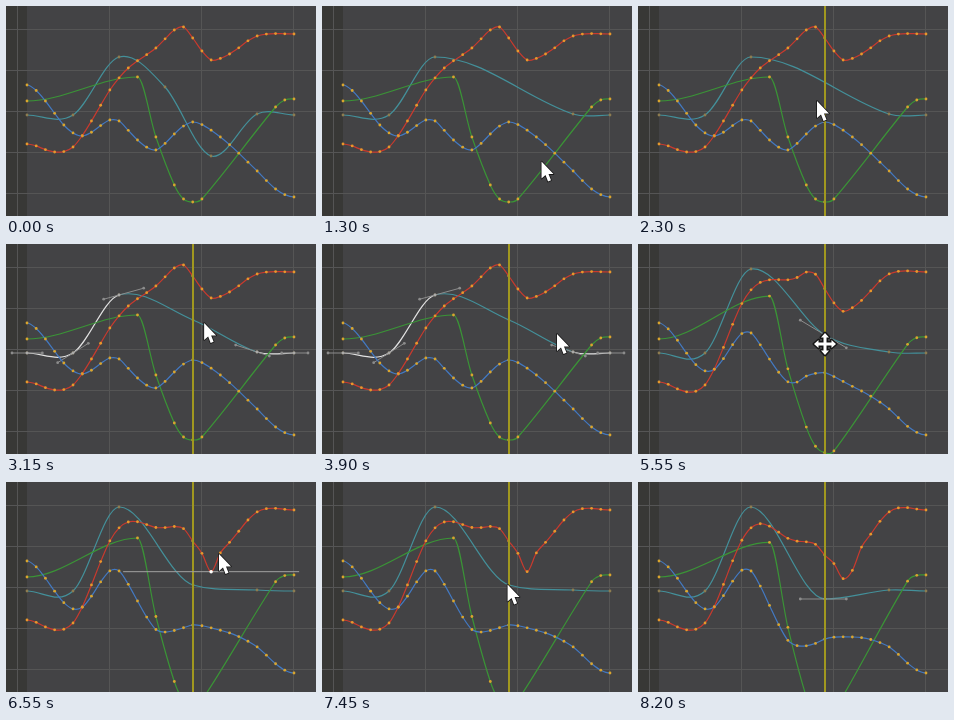
An HTML page with a canvas for the animation above (8500 ms loop, 310 by 210 pixels).

```html
<!DOCTYPE html>
<html lang="en">
<head>
<meta charset="utf-8">
<title>Curve editor</title>
<style>
html, body { margin: 0; height: 100%; overflow: hidden; background: #434345; }
canvas { display: block; }
</style>
</head>
<body>
<canvas id="stage" width="310" height="210"></canvas>
<script>
const ctx = document.getElementById('stage').getContext('2d');
const LOOP = 8500, STEP = 50;
const FRAMES = 30, SWEEP = 200, SWEEP_START = 50;
const TEAL = '#43909a';
const mix = (a, b, p) => a + (b - a) * p;
const within = (t, a, b) => t >= a && t < b;
const frameX = i => 21 + i * 267 / 29;

// Linear interpolation through [time, ...values] stops
function track(t, stops) {
  const next = stops.findIndex(s => s[0] >= t);
  if (next === 0) return stops[0].slice(1);
  if (next < 0) return stops[stops.length - 1].slice(1);
  const a = stops[next - 1], b = stops[next];
  const p = (t - a[0]) / (b[0] - a[0]);
  return a.slice(1).map((v, k) => mix(v, b[k + 1], p));
}

// A key is [x, y] or [x, y, slope]; without a slope it is smoothed by its neighbours
function slopeAt(keys, i) {
  if (keys[i].length > 2) return keys[i][2];
  const a = keys[i - 1], b = keys[i + 1];
  return a && b ? (b[1] - a[1]) / (b[0] - a[0]) : 0;
}

function sample(keys, x) {
  const i = Math.max(1, keys.findIndex(k => k[0] >= x - 1e-6));
  const [x1, y1] = keys[i - 1], [x2, y2] = keys[i];
  const d = x2 - x1, p = (x - x1) / d, q = 1 - p;
  return y1 * q * q * (1 + 2 * p) + y2 * p * p * (1 + 2 * q)
    + d * p * q * (q * slopeAt(keys, i - 1) - p * slopeAt(keys, i));
}

// Resting curves as [frame, y]
const redBase = [[0, 138], [3, 146], [5, 141], [7, 115], [9, 84], [11, 62], [14, 42],
  [16, 24], [17, 21], [19, 45], [20, 54], [22, 48], [25, 30], [29, 28]];
const blueBase = [[0, 79], [2, 95], [4, 119], [6, 130], [9, 114], [10, 115], [12, 134],
  [14, 144], [16, 128], [18, 116], [21, 131], [25, 165], [27, 183], [29, 191]];
const greenBase = [[0, 95], [12, 71, 0], [14, 131], [16, 179], [17, 193], [18, 196],
  [19, 193], [27, 101], [28, 94], [29, 93]];
const everyFrame = base => Array.from({ length: FRAMES }, (_, i) => [i, sample(base, i)]);
const redFrames = everyFrame(redBase), blueFrames = everyFrame(blueBase);

function tealKeys(t) {
  const keys = [[21, 109], [67, 109], [113, track(t, [[4670, 51], [4850, 26], [5100, 25]])[0]]];
  if (t < 1300) keys.push([159, 81], [205, 150]);
  if (t >= 3000) keys.push([187, ...track(t, [
    [4670, 76, .41], [4850, 76, .6], [5200, 76, .6], [5400, 91, .6], [5550, 91, .6],
    [5850, 103, .3], [7700, 103, .3], [7950, 117, 0]])]);
  return [...keys, [251, 108], [288, 109]];
}

// The other curves follow the teal one; a sweep refreshes them frame by frame
const rest = tealKeys(4600);
function shift(i, t) {
  const first = SWEEP_START + i * SWEEP / FRAMES;
  const visit = first + Math.floor((t - first) / SWEEP) * SWEEP;
  if (visit < 4600) return 0;
  return sample(tealKeys(visit), frameX(i)) - sample(rest, frameX(i));
}

const follow = (keys, t) => keys.map(([i, y, ...slope]) => [frameX(i), y + shift(i, t), ...slope]);

function redKeys(t) {
  const [depth, center] = track(t, [[6200, 0, 20], [6400, 14, 20], [7750, 14, 20], [8150, 14, 20.5]]);
  const dent = i => depth * Math.exp(-(((i - center) / .8) ** 4));
  return follow(redFrames, t).map(([x, y], i) => [x, y + dent(i)]);
}

function line(x1, y1, x2, y2, color) {
  ctx.strokeStyle = color;
  ctx.lineWidth = 1;
  ctx.beginPath();
  ctx.moveTo(x1, y1);
  ctx.lineTo(x2, y2);
  ctx.stroke();
}

function dot(x, y, color, r = 1.4) {
  ctx.fillStyle = color;
  ctx.beginPath();
  ctx.arc(x, y, r, 0, 7);
  ctx.fill();
}

function curve(keys, color, dotColor, segmentColor = () => color) {
  ctx.lineWidth = 1.2;
  for (let i = 1; i < keys.length; i++) {
    const [x1, y1] = keys[i - 1], [x2, y2] = keys[i], d = (x2 - x1) / 3;
    ctx.strokeStyle = segmentColor(keys[i - 1], keys[i]);
    ctx.beginPath();
    ctx.moveTo(x1, y1);
    ctx.bezierCurveTo(x1 + d, y1 + d * slopeAt(keys, i - 1), x2 - d, y2 - d * slopeAt(keys, i), x2, y2);
    ctx.stroke();
  }
  for (const [x, y] of keys) dot(x, y, dotColor);
}

function handles(keys, i) {
  const [x, y] = keys[i], slope = slopeAt(keys, i);
  const left = i ? (x - keys[i - 1][0]) / 3 : 15;
  const right = keys[i + 1] ? (keys[i + 1][0] - x) / 3 : 14;
  line(x - left, y - left * slope, x + right, y + right * slope, '#8c8c8c');
  for (const d of [-left, right]) dot(x + d, y + d * slope, '#8c8c8c');
  dot(x, y, '#aaa');
}

function teal(t) {
  const keys = tealKeys(t), all = within(t, 2600, 4300);
  curve(keys, TEAL, '#8d7c50', (a, b) =>
    all && a[0] !== 187 && b[0] !== 187 ? '#e2e2e2' : TEAL);
  keys.forEach(([x], i) => {
    const picked = all && x !== 187
      || x === 113 && within(t, 4300, 5150)
      || x === 187 && (within(t, 5150, 6450) || t >= 7700);
    if (picked) handles(keys, i);
  });
}

function grid() {
  ctx.fillStyle = '#434345';
  ctx.fillRect(0, 0, 310, 210);
  ctx.fillStyle = '#383836';
  ctx.fillRect(0, 0, 21, 210);
  ctx.fillStyle = '#555555';
  for (let x = 12; x < 310; x += 92) ctx.fillRect(x - 1, 0, 1, 210);
  for (let y = 23; y < 210; y += 41) ctx.fillRect(0, y, 310, 1);
}

function playhead(t) {
  if (t < 1850) return;
  const [x] = track(t, [[1850, 12], [2050, 187]]);
  ctx.fillStyle = '#a1981f';
  ctx.fillRect(Math.round(x) - 1, 0, 2, 210);
}

const cursorStops = [
  [350, 150, 0], [450, 140, 28], [700, 237, 177], [900, 237, 177], [950, 238, 178],
  [2200, 172, 98], [2300, 179, 95], [2600, 183, 76], [2850, 183, 76], [3000, 187, 76],
  [3700, 239, 90], [3900, 235, 90], [4400, 113, 51], [4670, 113, 51], [4850, 113, 26],
  [4950, 113, 26], [5200, 187, 85], [5400, 187, 100], [5550, 187, 100], [5850, 187, 112],
  [6000, 187, 112], [6400, 213, 72], [7050, 213, 72], [7350, 185, 102], [7700, 187, 104],
  [7950, 187, 117]
];
const arrowShape = new Path2D('M0 0V17L4 13.5L6.5 20L9.5 18.7L7 12.5H12Z');
const moveShape = new Path2D('M0-11L4-6.5H1.5V-1.5H6.5V-4L11 0L6.5 4V1.5H1.5V6.5H4L0 11L-4 6.5H-1.5V1.5H-6.5V4L-11 0L-6.5-4V-1.5H-1.5V-6.5H-4Z');

function cursor(t) {
  if (!within(t, 350, 1450) && !within(t, 2200, 8150)) return;
  const moving = within(t, 4550, 4950) || within(t, 5150, 5900) || t >= 7700;
  const shape = moving ? moveShape : arrowShape;
  ctx.save();
  ctx.translate(...track(t, cursorStops));
  ctx.lineJoin = 'round';
  ctx.lineWidth = moving ? 3 : 1.6;
  ctx.strokeStyle = '#161616';
  ctx.stroke(shape);
  ctx.fillStyle = '#fff';
  ctx.fill(shape);
  ctx.restore();
}

function marquee(t) {
  if (!within(t, 450, 1300)) return;
  const [x, y] = track(t, cursorStops);
  ctx.strokeStyle = '#a0a0a0';
  ctx.lineWidth = 1;
  ctx.setLineDash([3, 3]);
  ctx.strokeRect(140.5, 28.5, x - 140, y - 28);
  ctx.setLineDash([]);
}

// Long tangent turning about the dented red key
function tangent(t) {
  if (!within(t, 6500, 7100)) return;
  const [x, y] = redKeys(t)[20];
  const [angle] = track(t, [[6550, 0], [7050, Math.PI]]);
  const dx = 88 * Math.cos(angle), dy = 88 * Math.sin(angle);
  line(x - dx, y - dy, x + dx, y + dy, '#a0a0a0');
  dot(x, y, '#fff', 1.7);
}

function draw(t) {
  grid();
  teal(t);
  curve(follow(greenBase, t), '#3a9436', '#d9a52e');
  curve(follow(blueFrames, t), '#4379c2', '#d9a52e');
  curve(redKeys(t), '#c93a2e', '#e6982c');
  playhead(t);
  tangent(t);
  marquee(t);
  cursor(t);
}

function tick() {
  draw(Math.floor(performance.now() % LOOP / STEP) * STEP);
  requestAnimationFrame(tick);
}
tick();
</script>
</body>
</html>
```
